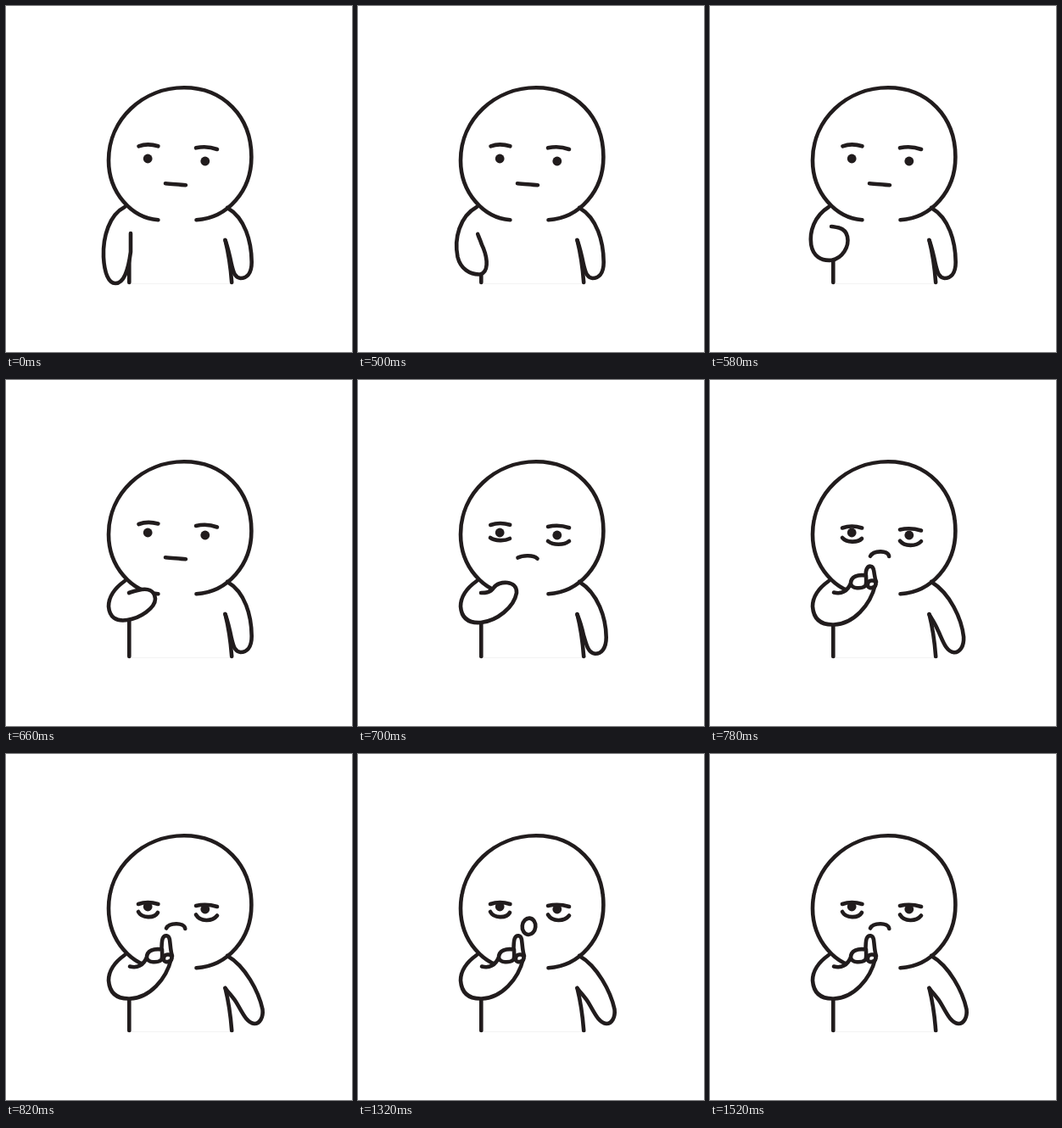
An HTML page that plays this animation: 408 px wide and 408 px high, repeating every 2020 ms.

```html
<!DOCTYPE html>
<html lang="en">
<head>
<meta charset="utf-8">
<title>Thinking figure</title>
<style>
  html, body { margin: 0; width: 100%; height: 100%; overflow: hidden; background: #fff; }
  svg { display: block; width: 100%; height: 100%; }
  path, ellipse { fill: none; stroke: #211c1d; stroke-width: 4.6; stroke-linecap: round; stroke-linejoin: round; }
  .solid { fill: #fff; }
  .eye { fill: #211c1d; stroke: none; }
  .ground { stroke: #f3f3f3; stroke-width: 1; }
</style>
</head>
<body>
<svg viewBox="0 0 408 408">
  <path class="ground" d="M147 327.5H266"/>
  <path d="M145.3 284V326"/>
  <path id="rightArm"/>
  <path d="M258.5 276C262 290 265 310 266.2 326"/>
  <path d="M179.4 252.3C148 250 121 220 121 182C121 133 162 96.3 210 96.3C256 96.3 289.4 130 289.4 178C289.4 218 261.5 250 224.5 252.3"/>
  <ellipse class="eye" cx="167.2" cy="180" rx="5.4" ry="5.4"/>
  <ellipse class="eye" cx="234.8" cy="183" rx="5.4" ry="5.4"/>
  <path id="brows"/>
  <path id="lids"/>
  <path id="mouth"/>
  <ellipse id="openMouth" cx="201.5" cy="203.3" transform="rotate(6 201.5 203.3)"/>
  <path id="leftArm" class="solid"/>
  <path id="fist" class="solid" d="M166 238C168 228 180 225 193 227C199 231 196 246 191 247C180 249 168 247 166 238Z"/>
  <g id="pointing">
    <path id="finger" class="solid"/>
    <path class="solid" d="M166 240C166 232 174 229 184 230.5C184 236 185 240 183 243C179 246 167 247 166 240Z"/>
    <path class="solid" d="M186 240C187 235.5 194 235.5 195.5 239C196.5 245 188 247 186 243Z"/>
  </g>
</svg>
<script>
const LOOP = 2020;
const raisedArm = 'M140 237C126 247 121 257 121 267C122 281 130 289 146 288.5C169 288 189 266 195 241C190 240 172 240 166 240C162 249 155 253 146 250.5';

// Each part: [time, path] keys with matching point counts.
const tracks = {
  leftArm: [
    [0, 'M140 237C122 246 114 272 115 296C116 315 121 327 129 327C139 327 144 312 147 290C147 283 147 280 147 277C147 274 147 271 147 268'],
    [500, 'M140 237C120 248 113 274 117.5 296C121 310 132 317 144 316.5C154 314 153 299 148 286C146 282 145 279 144 276C143 274 142 271 141.2 269'],
    [660, 'M140 237C126 247 121 258 121 267C122 280 130 285 143 283C158 281 176 269 176 258C175 247 166 246 160 247C155 248 150 249 145 251'],
    [700, 'M140 237C126 247 121 257 121 267C122 281 130 287 145 286C164 284 184 268 187 251C188 236 166 236 160 245C156 251 150 251 145 251'],
    [740, raisedArm]
  ],
  rightArm: [
    [660, 'M261 238C282 250 289.5 278 289.7 302C289.7 316 283.5 321 276.5 321C269 320 268 312 266 305C264 295 261 283 258.5 276'],
    [740, 'M261 238C284 253 295.5 283 295.7 305C295.7 318 289.5 325 282.5 324.5C272 323 270 308 266 297C264 289 261 282 258.5 277'],
    [820, 'M261 238C282 250 298 280 302.5 301C303.7 311 299 318 293 318C283 317 278 303 271 292C267 286 262 281 258.5 276']
  ],
  brows: [
    [580, 'M156.5 165.3Q167 161.5 179.4 165.3M224 167.3Q237 164.5 249 169'],
    [660, 'M156.5 170Q167 166 179.4 169.5M224 172Q237 169 249 173.5'],
    [740, 'M156 172Q167 168 179 172M224 174Q236 171 249 175'],
    [820, 'M156 177Q167 173 179.4 177M224 179Q236 176 249 180']
  ],
  lids: [
    [740, 'M156 186C162 190 173 190 179 187M224 190C230 195 243 195 249 190'],
    [820, 'M156 186C160 194 175 194 179 187M224 189.5C229 198 243 198 249 190.5']
  ],
  mouth: [
    [660, 'M188 209.2C196 209.7 204 210.7 212 211.2'],
    [740, 'M189 210C193 203 210 202 211 210'],
    [820, 'M189 205.5C192 199 210 198 211.3 206']
  ],
  finger: [
    [740, 'M183 236C184 234 183 231 185 228C187 224 192 224 193 229C194 231 194 234 196 238'],
    [820, 'M183 236C184 228 183 221 185 217C187 213 192 213 193 219C194 226 194 233 196 238']
  ]
};

const el = id => document.getElementById(id);
const show = (id, on) => el(id).setAttribute('visibility', on ? 'visible' : 'hidden');

function mixPaths(a, b, k) {
  const ends = b.match(/[\d.]+/g);
  let i = 0;
  return a.replace(/[\d.]+/g, n => (+n + (ends[i++] - n) * k).toFixed(2));
}

function pathAt(keys, t) {
  const next = keys.findIndex(([time]) => time > t);
  if (next === 0) return keys[0][1];
  if (next < 0) return keys[keys.length - 1][1];
  const [t0, a] = keys[next - 1], [t1, b] = keys[next];
  return mixPaths(a, b, (t - t0) / (t1 - t0));
}

function draw(t) {
  // The gesture advances in 40 ms steps and then holds.
  const step = t < 500 ? 0 : Math.min(820, 500 + Math.floor((t - 500) / 40) * 40);
  for (const id in tracks) el(id).setAttribute('d', pathAt(tracks[id], step));

  const open = t >= 1320 && t < 1520;
  const small = t >= 1420;
  el('openMouth').setAttribute('rx', small ? 7 : 7.8);
  el('openMouth').setAttribute('ry', small ? 8.5 : 9.7);
  show('openMouth', open);
  show('mouth', !open);
  show('lids', step >= 700);
  show('fist', step === 740);
  show('pointing', step >= 780);
}

const start = performance.now();
function tick() {
  draw((performance.now() - start) % LOOP);
  requestAnimationFrame(tick);
}
tick();
</script>
</body>
</html>
```
